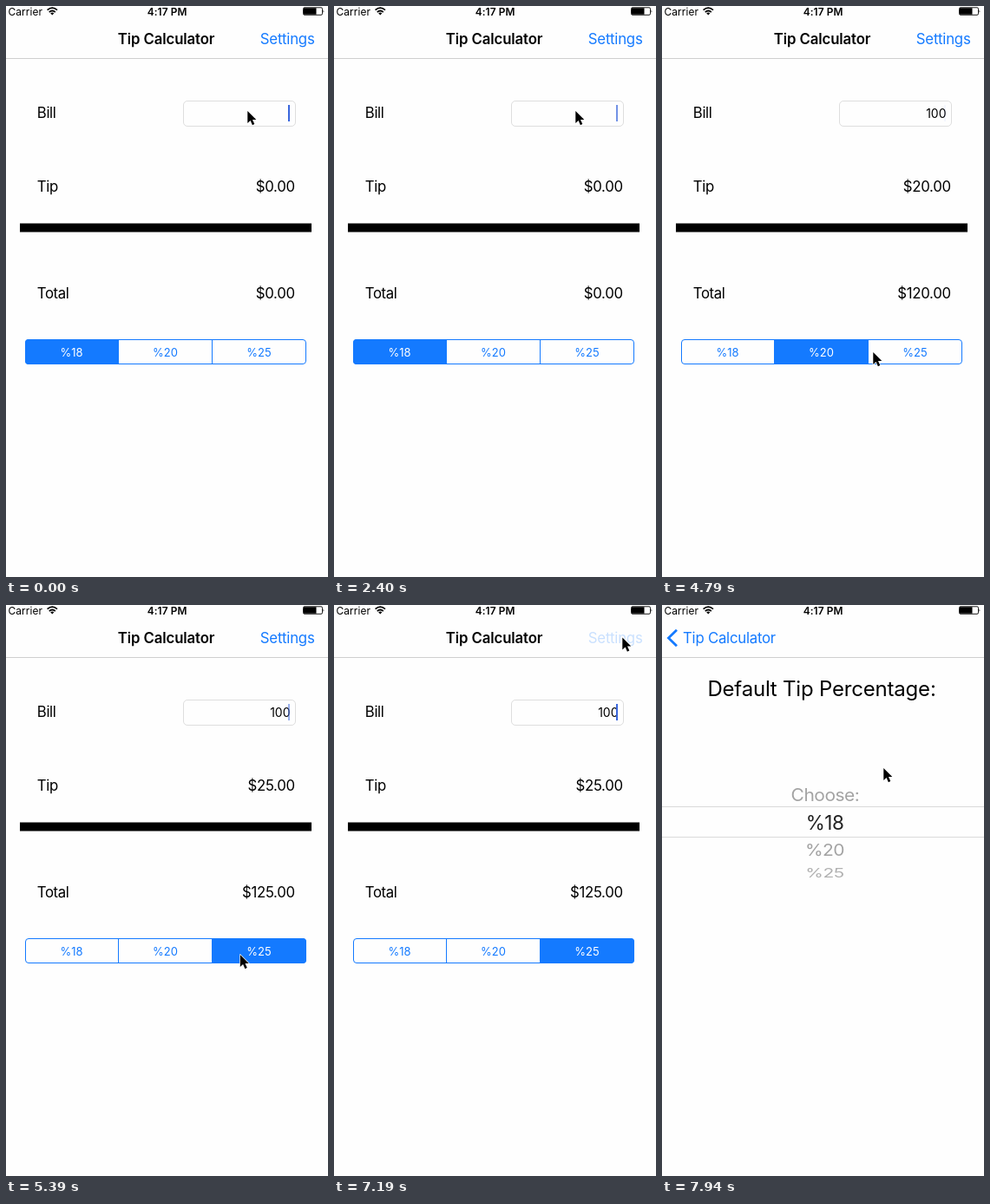
These frames come from a looping animation (371 by 658 pixels, 8 s). An HTML page:

```html
<!DOCTYPE html>
<html lang="en">
<head>
<meta charset="utf-8">
<title>Tip Calculator</title>
<style>
  html, body { margin: 0; width: 100%; height: 100%; overflow: hidden; background: #fefefe; }
  svg { display: block; width: 371px; height: 658px; }
  text { font: 16.8px Inter, Roboto, sans-serif; letter-spacing: -.4px; white-space: pre; }
  .end { text-anchor: end; }
  .mid { text-anchor: middle; }
  .blue { fill: #147aff; }
  text.blue { letter-spacing: -.25px; }
  .amount { letter-spacing: -.3px; }
  .bold { font-weight: 600; letter-spacing: -.13px; }
  .status text { font-size: 11.9px; letter-spacing: .08px; }
  .field { font-size: 14px; letter-spacing: 0; }
  .seg text { font-size: 13px; letter-spacing: 0; }
  .heading { font-size: 24px; letter-spacing: -.2px; }
  .wheel text { font-size: 21px; letter-spacing: -.5px; text-anchor: middle; }
</style>
</head>
<body>
<svg viewBox="0 0 371 658">
  <defs>
    <clipPath id="segClip"><rect x="22" y="384" width="324" height="29" rx="4"/></clipPath>
  </defs>
  <rect width="371" height="658" fill="#fefefe"/>

  <g id="home">
    <text x="35.8" y="129">Bill</text>
    <text x="35.8" y="214">Tip</text>
    <text x="35.8" y="337">Total</text>
    <rect x="204.5" y="109.5" width="129" height="29" rx="4.5" fill="#fefefe" stroke="#dedede"/>
    <text id="bill" class="field end" x="327.5" y="129"></text>
    <rect id="caret" x="325" y="114" width="2" height="19" fill="#3a66dc"/>
    <text id="tip" class="amount end" x="332.8" y="214"></text>
    <text id="total" class="amount end" x="332.8" y="337"></text>
    <rect x="16" y="250.5" width="336" height="10"/>
    <g id="segments" class="seg"></g>
  </g>
  <rect id="dim" y="61" width="371" height="597" opacity="0"/>

  <g id="options">
    <rect y="61" width="371" height="597" fill="#fefefe"/>
    <text class="heading mid" x="184" y="105">Default Tip Percentage:</text>
    <path d="M0 232.5H371M0 267.5H371" stroke="#dadada"/>
    <g class="wheel">
      <text transform="translate(188 226) scale(1 .93)" fill="#a3a3a3">Choose:</text>
      <text x="187.5" y="258.5" fill="#222" style="font-size:22.5px">%18</text>
      <text transform="translate(187.5 289) scale(1 .92)" fill="#a3a3a3">%20</text>
      <text transform="translate(187.5 314) scale(1 .7)" fill="#b0b0b0">%25</text>
    </g>
  </g>

  <rect width="371" height="60" fill="#fefefe"/>
  <path d="M0 60.5H371" stroke="#cfcfcf"/>
  <text id="title" class="bold mid" x="184.6" y="44">Tip Calculator</text>
  <text id="settings" class="blue end" x="355.5" y="44">Settings</text>
  <g id="back">
    <path d="M17 28.8L7.5 38L17 47.2" fill="none" stroke="#147aff" stroke-width="2.8"/>
    <text id="backLabel" class="blue" x="24" y="44">Tip Calculator</text>
  </g>

  <g class="status">
    <text x="2.5" y="10.5">Carrier</text>
    <g fill="none" stroke="#000" stroke-width="1.7">
      <path d="M47.6 4.7Q53.3 -.3 59 4.7M49.8 7Q53.3 4 56.8 7"/>
      <path d="M51.2 8.3Q53.3 6.7 55.4 8.3L53.3 10.6Z" fill="#000" stroke="none"/>
    </g>
    <text class="bold mid" x="185.6" y="10.5">4:17 PM</text>
    <rect x="342.5" y="1.8" width="22" height="8.5" rx="1.5" fill="none" stroke="#000" stroke-width=".9"/>
    <path d="M343 2.3h14.5v7.5h-14.5zM365.6 4.4q1.6 1.6 0 3.3z"/>
  </g>

  <path id="pointer" d="M.8 1V15L4.1 12L6.4 17.2L8.8 16.1L6.5 11.1H10.8Z"
        stroke="#fff" stroke-width="1.4" paint-order="stroke" stroke-linejoin="round"/>
</svg>

<script>
const LOOP = 8000;
const SEGMENT_WIDTH = 108;
const BLUE = '#147aff';
const rates = [18, 20, 25];
const $ = id => document.getElementById(id);

// Each row changes some properties at a time (ms); the others carry on.
const steps = [
  [0, { bill: '', rate: 18, caret: 1, at: [277.5, 120], settings: 1, push: 0 }],
  [150, { bill: '1' }],
  [300, { bill: '10' }],
  [450, { bill: '100' }],
  [1050, { caret: .5 }],
  [1200, { caret: 0 }],
  [1500, { bill: '10', caret: 1 }],
  [1650, { bill: '1' }],
  [1800, { bill: '' }],
  [2400, { caret: .7 }],
  [2550, { bill: '10', caret: 1 }],
  [2700, { bill: '100' }],
  [3290, { caret: .5, at: [270, 145] }],
  [3440, { caret: 0, at: [242, 235] }],
  [3590, { at: [200, 340] }],
  [3740, { caret: .5, at: [176, 386] }],
  [3890, { caret: 1, at: [169.5, 394] }],
  [4190, { rate: 20 }],
  [4340, { caret: .5 }],
  [4490, { caret: 0 }],
  [4790, { caret: .05, at: [242.5, 398] }],
  [4940, { caret: 1, at: [264, 401] }],
  [5090, { at: [269, 402] }],
  [5240, { rate: 25 }],
  [5390, { caret: .5 }],
  [5540, { caret: 0 }],
  [5840, { caret: .5 }],
  [5990, { caret: 1 }],
  [6290, { at: [278, 355] }],
  [6440, { caret: .5, at: [300, 225] }],
  [6590, { caret: 0, at: [320, 100] }],
  [6740, { at: [330, 46] }],
  [6890, { caret: 1, at: [331.5, 36.5] }],
  [7190, { settings: .22 }],
  [7490, { push: .4 }],
  [7640, { push: .85, at: [322, 62] }],
  [7790, { push: .98, at: [278, 145] }],
  [7940, { push: 1, at: [254.5, 187] }],
];

const segmentLeft = i => 22 + i * SEGMENT_WIDTH;
$('segments').innerHTML =
  `<g clip-path="url(#segClip)"><rect id="pick" class="blue" y="384" width="${SEGMENT_WIDTH}" height="29"/></g>
   <path d="M129.5 385V412M237.5 385V412" stroke="${BLUE}"/>
   <rect x="22.5" y="384.5" width="323" height="28" rx="3.5" fill="none" stroke="${BLUE}"/>` +
  rates.map((rate, i) =>
    `<text id="rate${rate}" class="mid" x="${segmentLeft(i) + 53.5}" y="403.6">%${rate}</text>`).join('');

const money = value => '$' + value.toFixed(2);
const shift = (id, x, y = 0) => $(id).setAttribute('transform', `translate(${x} ${y})`);
const fade = (id, value) => $(id).setAttribute('opacity', value);

function stateAt(time) {
  return Object.assign({}, ...steps.filter(([start]) => start <= time).map(step => step[1]));
}

function draw(time) {
  const { bill, rate, caret, at, settings, push } = stateAt(time);
  const tip = bill * rate / 100;
  $('bill').textContent = bill;
  $('tip').textContent = money(tip);
  $('total').textContent = money(+bill + tip);
  fade('caret', caret);

  $('pick').setAttribute('x', segmentLeft(rates.indexOf(rate)));
  for (const r of rates) $('rate' + r).setAttribute('fill', r === rate ? '#fff' : BLUE);

  shift('home', -111 * push);
  shift('options', 371 * (1 - push));
  fade('dim', .1 * push);
  shift('title', -108 * push);
  fade('title', Math.max(0, 1 - 1.4 * push));
  fade('settings', settings * (1 - push));
  shift('backLabel', 106 * (1 - push));
  fade('back', push);
  shift('pointer', ...at);
}

const began = performance.now();
function tick() {
  draw((performance.now() - began) % LOOP);
  requestAnimationFrame(tick);
}
tick();
</script>
</body>
</html>
```
